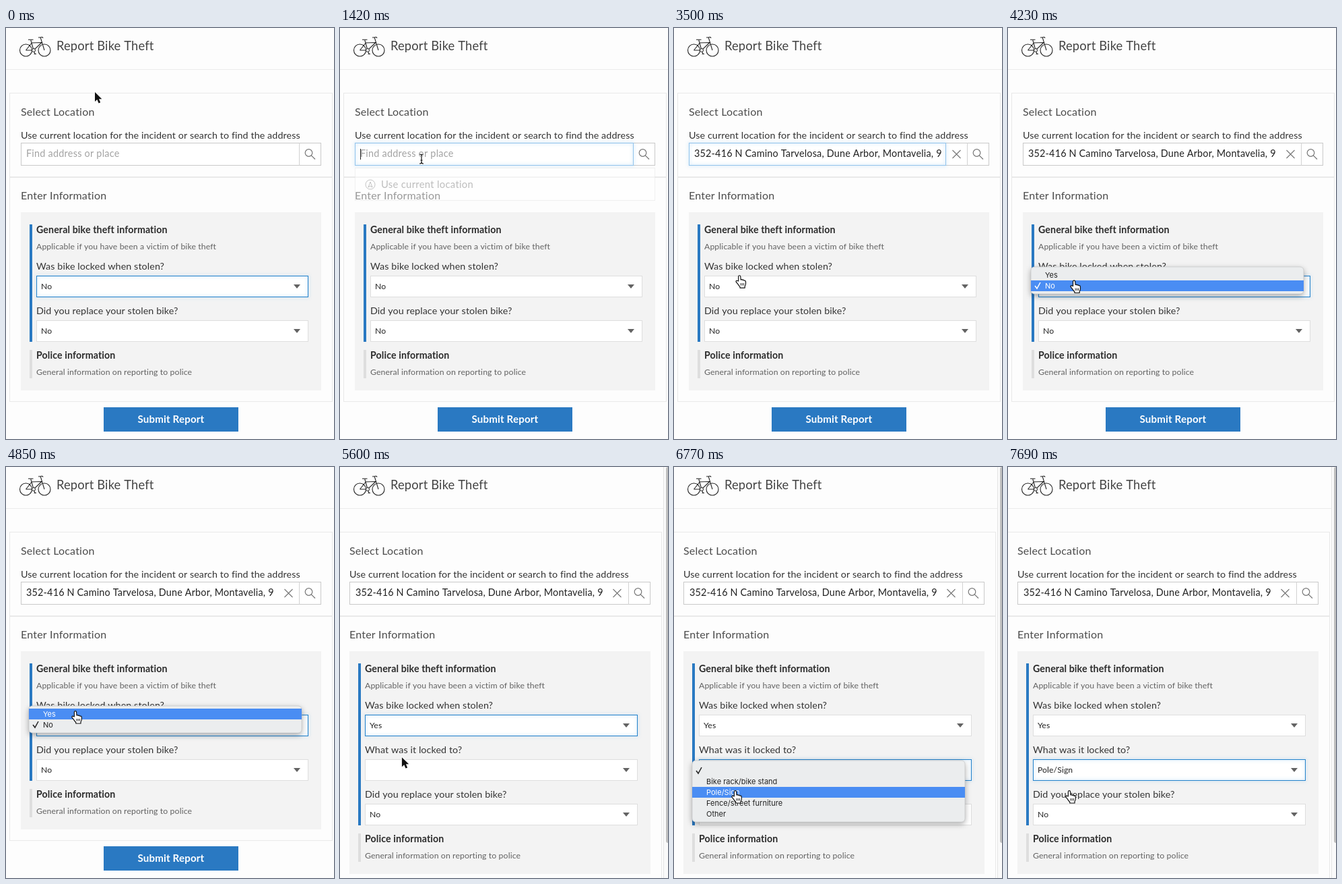
Animation, 487 px wide and 609 px high, one loop 8000 ms. Source, as an HTML page with a canvas:

```html
<!DOCTYPE html>
<html lang="en">
<head>
<meta charset="utf-8">
<title>Report Bike Theft</title>
<style>
  html, body { margin: 0; width: 100%; height: 100%; overflow: hidden; background: #fdfdfd; }
  canvas { display: block; width: 487px; height: 609px; }
</style>
</head>
<body>
<canvas></canvas>
<script>
const LOOP = 8000, W = 487, H = 609;
const BLUE = '#2a79c2';
const canvas = document.querySelector('canvas');
const ctx = canvas.getContext('2d');
const dpr = window.devicePixelRatio || 1;
canvas.width = W * dpr;
canvas.height = H * dpr;

// [font, letter spacing, colour]
const STYLES = {
  title: ['18.3px Lato, sans-serif', 0.18, '#444'],
  heading: ['16px Lato, sans-serif', 0.2, '#4c4c4c'],
  label: ['14.3px Lato, sans-serif', 0.09, '#333'],
  hint: ['14.4px Lato, sans-serif', 0.25, '#a3a3a3'],
  input: ['14.4px Lato, sans-serif', 0.18, '#222'],
  suggestion: ['14.8px Lato, sans-serif', 0.3, '#666'],
  group: ['bold 14.2px Lato, sans-serif', 0.12, '#2b2b2b'],
  note: ['12.3px Lato, sans-serif', 0.09, '#626262'],
  value: ['12.2px Lato, sans-serif', 0.1, '#222'],
  button: ['bold 15.1px Lato, sans-serif', 0.16, '#fff'],
  option: ['11px Inter, sans-serif', 0, '#222'],
};

// Pointer stops: [time, x, y]
const STOPS = [
  [0, 132, 95], [710, 132, 95], [1150, 121, 194], [1790, 121, 194],
  [2150, 110, 229], [3160, 110, 229], [3630, 96, 380], [4170, 96, 380],
  [4520, 103, 362], [5280, 103, 362], [5850, 89, 448], [6220, 89, 448],
  [6770, 91, 480], [LOOP, 91, 480],
];

const ramp = (t, a, b) => Math.min(1, Math.max(0, (t - a) / (b - a)));
const pulse = (t, a, b, c, d) => ramp(t, a, b) * (1 - ramp(t, c, d));
const within = (t, a, b) => t >= a && t < b;

function text(str, x, y, style, color) {
  const [font, spacing, ink] = STYLES[style];
  ctx.font = font;
  ctx.letterSpacing = spacing + 'px';
  ctx.fillStyle = color || ink;
  ctx.fillText(str, x, y);
}

function box(x, y, w, h, fill) {
  ctx.fillStyle = fill;
  ctx.fillRect(x, y, w, h);
}

function outline(x, y, w, h, color) {
  ctx.strokeStyle = color;
  ctx.lineWidth = 1;
  ctx.strokeRect(x + 0.5, y + 0.5, w - 1, h - 1);
}

function path(d, stroke, width = 1, fill) {
  const p = new Path2D(d);
  if (fill) { ctx.fillStyle = fill; ctx.fill(p); }
  if (stroke) { ctx.strokeStyle = stroke; ctx.lineWidth = width; ctx.stroke(p); }
}

function faded(alpha, draw) {
  if (alpha <= 0) return;
  ctx.save();
  ctx.globalAlpha = alpha;
  draw();
  ctx.restore();
}

function at(x, y, draw) {
  ctx.save();
  ctx.translate(x, y);
  draw();
  ctx.restore();
}

function focusRing(x, y, w, h, alpha, color) {
  faded(alpha, () => {
    ctx.shadowColor = 'rgba(102,175,233,.7)';
    ctx.shadowBlur = 5 * dpr;
    outline(x, y, w, h, color);
  });
}

function select(x, y, w, value, focus) {
  box(x, y, w, 32, '#fff');
  outline(x, y, w, 32, '#dedede');
  focusRing(x, y, w, 32, focus, '#2382cb');
  text(value, x + 7, y + 20, 'value');
  at(x + w - 22, y + 13, () => path('M0 0H10L5 6Z', null, 0, '#636363'));
}

function bike() {
  path('M38.5 33A9 9 0 1 1 20.5 33A9 9 0 1 1 38.5 33' +
       'M66 33A9 9 0 1 1 48 33A9 9 0 1 1 66 33' +
       'M29.5 33H41L53 21.5L38.3 22L29.5 33M41 33L36.8 18M57 33L51.2 14H48' +
       'M33 17.3H40.5M51.2 14Q54 12.5 55 15M41 33L43 38M41.5 38.5H45', '#222', 1.1);
  path('M43.5 33A2.5 2.5 0 1 1 38.5 33A2.5 2.5 0 1 1 43.5 33', '#222', 1, '#fdfdfd');
}

function searchBox(t, dx, wide) {
  const x = 22 + dx, filled = t >= 2540;
  const right = 435 + dx + wide;
  box(x, 170, 446 + wide, 34, '#fff');
  outline(x, 170, 446 + wide, 34, '#c9c9c9');
  box(right, 170, 1, 34, '#d2d2d2');
  focusRing(x, 170, (filled ? 404 : 436) - 22, 34, pulse(t, 1200, 1400, 3690, 3820), '#93c4ec');
  if (filled) {
    text('352-416 N Camino Tarvelosa, Dune Arbor, Montavelia, 9', 30 + dx + wide, 191, 'input');
    at(419.5 + dx, 187, () => path('M-6 -6L6 6M6 -6L-6 6', '#777', 1.1));
  } else {
    text('Find address or place', 30, 191, 'hint');
    if (within(t, 1250, 2330)) box(30, 179, 1, 16, '#222');
  }
  at(right + 14.5, 185, () =>
    path('M5.3 0A5.3 5.3 0 1 1 -5.3 0A5.3 5.3 0 1 1 5.3 0M3.8 3.8L9.5 9.5', '#777', 1.2));
}

function suggestions(t, pointerY) {
  faded(pulse(t, 1340, 1530, 2330, 2460), () => {
    box(22, 207, 446, 48, '#fff');
    outline(22, 207, 446, 49, '#dcdcdc');
    if (pointerY > 215) box(23, 221, 444, 24, '#f2f2f2');
    at(45, 232, () => path('M7 0A7 7 0 1 1 -7 0A7 7 0 1 1 7 0M-3 4L0 -4L3 4L0 2Z', '#777'));
    text('Use current location', 61, 237, 'suggestion');
  });
}

function popup(x, y, h, firstRow, options, checked, active, alpha) {
  faded(alpha, () => {
    ctx.shadowColor = 'rgba(0,0,0,.35)';
    ctx.shadowBlur = 8 * dpr;
    ctx.shadowOffsetY = 3 * dpr;
    ctx.fillStyle = '#ebedee';
    ctx.beginPath();
    ctx.roundRect(x, y, 405, h, 5);
    ctx.fill();
    ctx.shadowColor = 'transparent';
    ctx.strokeStyle = '#c4c6c8';
    ctx.lineWidth = 0.7;
    ctx.stroke();
    options.forEach((name, i) => {
      const top = firstRow + i * 16, ink = i === active ? '#fff' : '#222';
      if (i === active) box(x, top, 405, 16, '#4a8df3');
      if (i === checked) at(x + 6, top + 8, () => path('M0 0L3 4L8 -5', ink, 1.5));
      text(name, x + 21, top + 12, 'option', ink);
    });
  });
}

function pointer(t, x, y) {
  const overItem = within(t, 2000, 2400) && y > 215;
  const overSelect = t > 3300 && (within(y, 361, 400) || y >= 434);
  at(x, y, () => {
    ctx.lineJoin = 'round';
    if (within(y, 170, 205)) {
      const beam = 'M-3 -7Q0 -7 0 -5Q0 -7 3 -7M0 -5V5M-3 7Q0 7 0 5Q0 7 3 7M-1.5 2H1.5';
      path(beam, '#fff', 2.6);
      path(beam, '#111', 1.2);
    } else if (overItem || overSelect) {
      path('M-1.6 8V1.2Q-1.6 -.3 0 -.3Q1.5 -.3 1.6 1.2L2 6Q3.3 5 4.4 6.4Q5.8 5.6 6.8 7.2' +
           'Q9 6.6 9.3 9V12Q9.2 14 8 15.5V18H.8V16.5Q-1 14.5 -2.8 11.8L-5 9.2' +
           'Q-5.6 7.2 -3.8 7.2Z', '#111', 1.2, '#fff');
      path('M2 11V14.5M4.2 11V14.5M6.4 11V14.5', '#111', 0.9);
    } else {
      const arrow = 'M0 0V14L3.3 11L5.6 16.4L8.2 15.3L6 10.2H10.3Z';
      path(arrow, '#fff', 2.2);
      path(arrow, null, 0, '#111');
    }
  });
}

function pointerAt(t) {
  const i = STOPS.findIndex(s => s[0] > t);
  const [t0, x0, y0] = STOPS[i - 1], [t1, x1, y1] = STOPS[i];
  const k = 1 - (1 - ramp(t, t0, t1)) ** 1.9;
  return [x0 + (x1 - x0) * k, y0 + (y1 - y0) * k];
}

function draw(t) {
  const [px, py] = pointerAt(t);
  const extended = t >= 5000;
  const dx = extended ? -8 : 0, wide = extended ? 1 : 0, dy = extended ? 66 : 0;
  const left = 45 + dx, width = 404 + wide;

  ctx.setTransform(dpr, 0, 0, dpr, 0, 0);
  box(0, 0, W, H, '#fdfdfd');
  bike();
  text('Report Bike Theft', 75, 33, 'title');
  box(0, 61, W, 1, '#ebebeb');

  outline(5 + dx, 96, 480 + wide, 458 + dy, '#e9e9e9');
  box(5 + dx, 220, 480 + wide, 2, '#e9e9e9');
  text('Select Location', 22 + dx, 130, 'heading');
  text('Use current location for the incident or search to find the address', 22 + dx, 164, 'label');
  searchBox(t, dx, wide);
  text('Enter Information', 22 + dx, 254, 'heading');

  box(22 + dx, 273, 446 + wide, 264 + dy, '#f3f3f3');
  box(35 + dx, 291, 4, 174 + dy, BLUE);
  box(35 + dx, 477 + dy, 4, 42, '#dedede');
  text('General bike theft information', left, 304, 'group');
  text('Applicable if you have been a victim of bike theft', left, 328, 'note');
  text('Was bike locked when stolen?', left, 358, 'label');
  select(left, 367, width, t < 4950 ? 'No' : 'Yes',
    1 - ramp(t, 90, 200) + pulse(t, 3690, 3820, 5830, 5960));
  if (extended) {
    text('What was it locked to?', left, 424, 'label');
    select(left, 433, width, t < 7530 ? '' : 'Pole/Sign', ramp(t, 5830, 5960));
  }
  text('Did you replace your stolen bike?', left, 424 + dy, 'label');
  select(left, 433 + dy, width, 'No', 0);
  text('Police information', left, 490 + dy, 'group');
  text('General information on reporting to police', left, 514 + dy, 'note');

  if (extended) {
    box(480, 0, 7, H, '#fafafa');
    box(480, 0, 1, H, '#e4e4e4');
    ctx.fillStyle = '#c0c0c0';
    ctx.beginPath();
    ctx.roundRect(484, 0, 6, 557, 3);
    ctx.fill();
  } else {
    box(145, 562, 200, 36, BLUE);
    text('Submit Report', 195.5, 585, 'button');
  }

  suggestions(t, py);
  if (within(t, 3800, 5030)) {
    const active = within(t, 4790, 4850) ? -1 : py < 374 ? 0 : 1;
    popup(34, 354, 40, 358, ['Yes', 'No'], 1, active, 1 - ramp(t, 4910, 5030));
  }
  if (within(t, 5940, 7690)) {
    const active = within(t, 7370, 7430) ? -1 : Math.floor((py - 442) / 16);
    popup(27, 435, 91, 442,
      ['', 'Bike rack/bike stand', 'Pole/Sign', 'Fence/street furniture', 'Other'],
      0, active, 1 - ramp(t, 7490, 7690));
  }
  pointer(t, px, py);
}

const start = performance.now();
function tick() {
  draw((performance.now() - start) % LOOP);
  requestAnimationFrame(tick);
}
tick();
</script>
</body>
</html>
```
